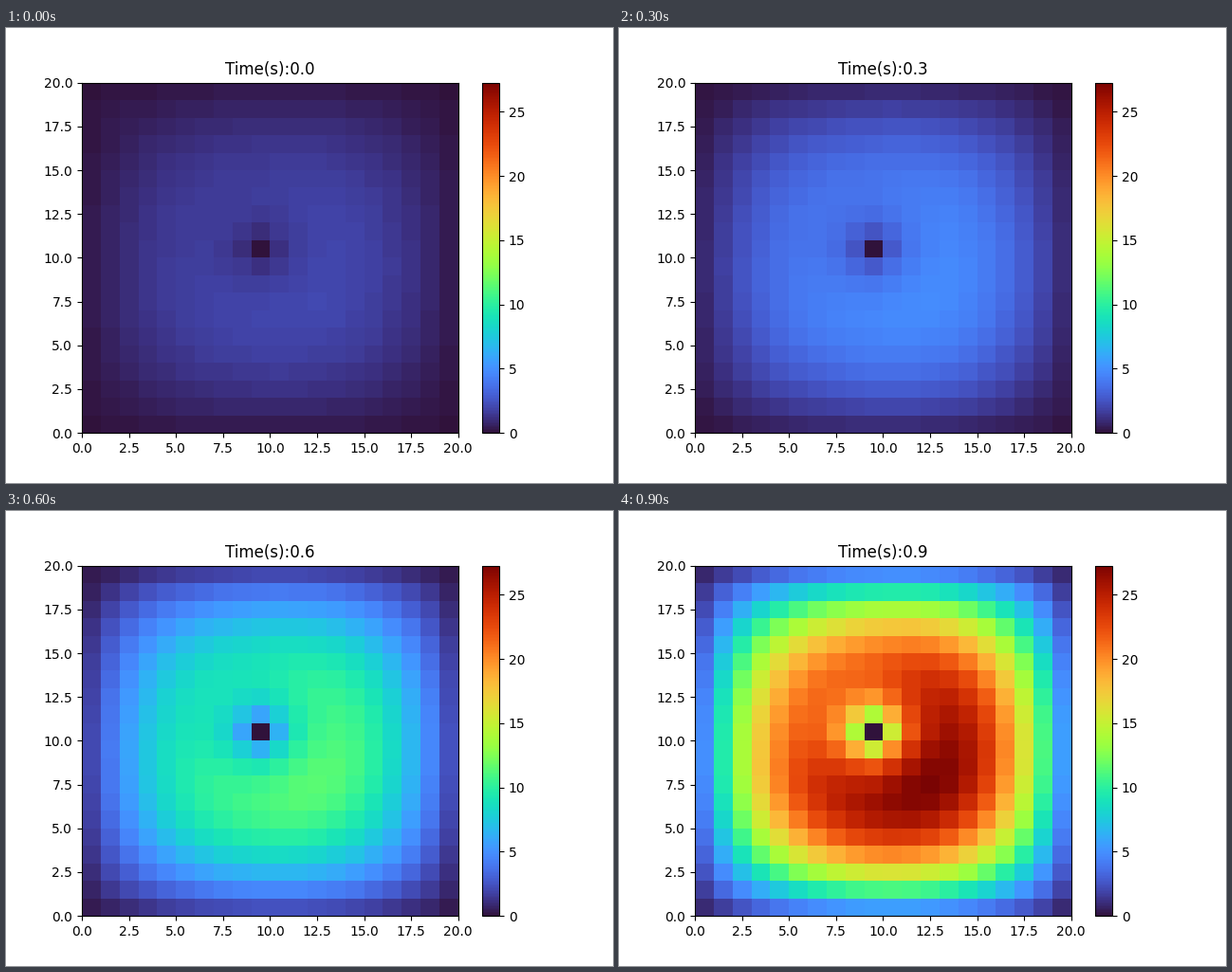
Recreate the animation shown at these times as a matplotlib script. Size 640 by 480 pixels, loop 1 s.

```python
import numpy as np
import matplotlib.pyplot as plt
from matplotlib.animation import FuncAnimation

N = 20                  # cells per side
ROD = (10, 9)           # absorbing cell: row, column
FRAMES = 10
STEP = 0.1              # seconds per frame
PEAK = 27.27            # highest flux, reached in the last frame
GROWTH = 1.335          # flux gain per frame


def fundamental_mode():
    """Lowest diffusion mode of a square, zero outside and at the rod."""
    line = 2 * np.eye(N) - np.eye(N, k=1) - np.eye(N, k=-1)
    laplacian = np.kron(line, np.eye(N)) + np.kron(np.eye(N), line)
    rod = ROD[0] * N + ROD[1]
    laplacian[rod, rod] += 1e5
    _, modes = np.linalg.eigh(laplacian)
    mode = np.abs(modes[:, 0]).reshape(N, N)
    return mode / mode.max()


MODE = fundamental_mode()


def flux(frame):
    return PEAK * GROWTH ** (frame - FRAMES + 1) * MODE


fig, ax = plt.subplots(figsize=(6.4, 4.8), dpi=100)
edges = np.arange(N + 1)
mesh = ax.pcolormesh(edges, edges, flux(0), cmap="turbo", vmin=0, vmax=PEAK)
fig.colorbar(mesh, ax=ax)
ticks = np.arange(0, N + 1, 2.5)
ax.set_xticks(ticks)
ax.set_yticks(ticks)
title = ax.set_title("Time(s):0.0")


def update(frame):
    mesh.set_array(flux(frame))
    title.set_text(f"Time(s):{frame * STEP:.1f}")
    return mesh, title


anim = FuncAnimation(fig, update, frames=FRAMES, interval=100, repeat=True)
plt.show()
```
